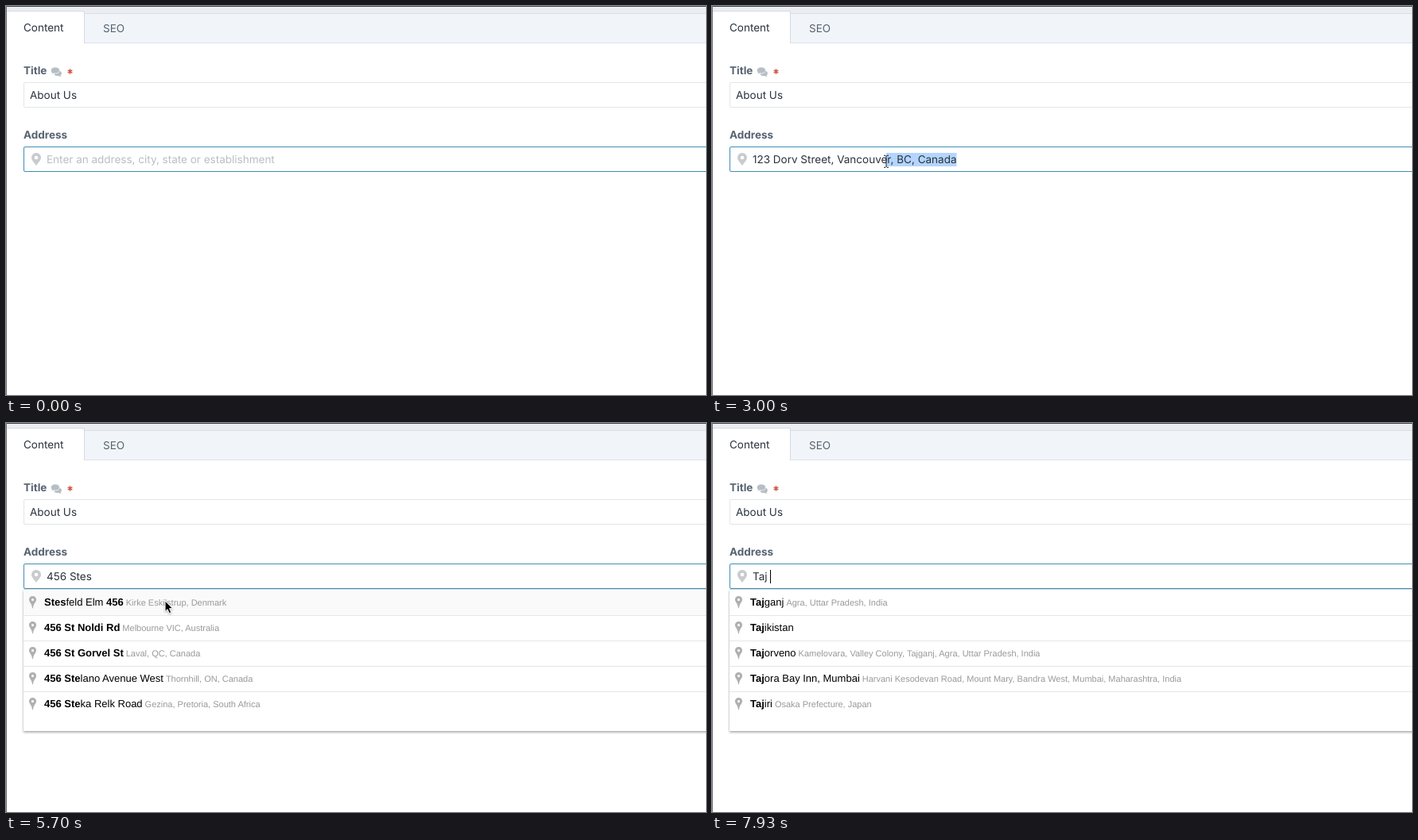
Recreate the animation shown at these times as an HTML page. Size 880 by 490 pixels, loop 8 s.

```html
<!DOCTYPE html>
<html lang="en">
<head>
<meta charset="utf-8">
<title>Address autocomplete</title>
<style>
  html, body { margin: 0; width: 100%; height: 100%; overflow: hidden; background: #fff; }
  svg { display: block; width: 880px; height: 490px; }
  text { white-space: pre; text-rendering: geometricPrecision; }
  .ui { font: 13.5px Inter, "Open Sans", sans-serif; fill: #29323d; }
  .label { font-weight: 700; fill: #576370; }
  .row { font: 13px "Liberation Sans", Arial, sans-serif; fill: #000; }
  .bold { font-weight: 700; }
  .place { font-size: 11px; fill: #999; }
</style>
</head>
<body>
<svg viewBox="0 0 880 490">
  <defs>
    <filter id="drop" x="-5%" y="-5%" width="110%" height="115%">
      <feDropShadow dx="0" dy="1.5" stdDeviation="1.4" flood-opacity=".38"/>
    </filter>
    <filter id="soft" x="-50%" y="-50%" width="200%" height="200%">
      <feDropShadow dx="0" dy="1" stdDeviation=".9" flood-opacity=".35"/>
    </filter>
    <path id="pin" fill="#b0b0b0" fill-rule="evenodd"
      d="M33.5 218a4.6 4.6 0 0 1 4.6 4.6c0 3-3.7 4.8-4.1 10.7h-1c-.4-5.900-4.100-7.700-4.100-10.700a4.600 4.600 0 0 1 4.600-4.600zm0 3a1.600 1.600 0 1 0 0 3.200a1.600 1.600 0 1 0 0-3.200z"/>
  </defs>

  <!-- page header -->
  <rect width="880" height="490" fill="#fff"/>
  <rect width="880" height="9" fill="#ebedf1"/>
  <rect y="9" width="880" height="38" fill="#f1f5f9"/>
  <rect y="9" width="880" height="1" fill="#d9dfe6"/>
  <rect y="46" width="880" height="1" fill="#dce2e8"/>
  <path d="M0 6H97a2 2 0 0 1 2 2V47H0z" fill="#d5dae1"/>
  <path d="M0 7H96.500a1.500 1.500 0 0 1 1.500 1.500V47H0z" fill="#fff"/>
  <rect width="880" height="1" fill="#3f444c"/>
  <rect width="1" height="490" fill="#6f7277"/>
  <text class="ui" x="22" y="32">Content</text>
  <text class="ui" x="122" y="33" style="fill:#576370">SEO</text>

  <!-- title field -->
  <text class="ui label" x="22" y="86">Title</text>
  <g fill="#b7bec8">
    <path d="M62 80.500c4 0 7.800 1.200 8 4.200c0 1.200-.7 2-1.500 2.600l1 1.500c-1.500 0-2.500-.4-3.300-.9c-2 .3-4.200-.1-5.400-1.200z"/>
    <path stroke="#fff" stroke-width=".7" d="M62 77c3.200 0 5.500 1.700 5.500 4s-2.300 4-5.500 4c-.6 0-1.200 0-1.800-.2c-.9.700-2 1.100-3.400 1.100c.6-.5 1-1.100 1.100-1.800c-.9-.8-1.500-1.800-1.500-3.100c0-2.300 2.400-4 5.600-4z"/>
  </g>
  <path d="M80.500 79.300v6.400M77.700 80.900l5.600 3.200M77.700 84.100l5.600-3.200" stroke="#cf5241" stroke-width="1.500"/>
  <rect x="22.500" y="96.500" width="870" height="31" rx="1.500" fill="#fff" stroke="#e3e5e8"/>
  <text class="ui" x="30" y="117">About Us</text>

  <!-- address field -->
  <text class="ui label" x="22" y="167">Address</text>
  <rect id="box" x="22.500" y="177.500" width="870" height="31" rx="1.500" fill="#fff"/>
  <path fill="#c8cbcf" fill-rule="evenodd" d="M38 185a6 6 0 0 1 6 6c0 3.500-3.800 6.500-6 10c-2.200-3.500-6-6.500-6-10a6 6 0 0 1 6-6zm0 3.700a2.300 2.300 0 1 0 0 4.600a2.300 2.300 0 1 0 0-4.600z"/>
  <rect id="mark" y="185" height="17" fill="#b4d5fe"/>
  <text id="value" class="ui" x="51" y="198"></text>
  <rect id="caret" y="185" width="1" height="17" fill="#000"/>

  <g id="menu">
    <rect x="22" y="210" width="880" height="178" fill="#fff" filter="url(#drop)"/>
    <rect x="22" y="209" width="858" height="1" fill="#d2d5d8"/>
    <rect id="hover" x="22" width="858" height="31" fill="#fafafa"/>
    <g id="rows"></g>
  </g>

  <path id="arrow" filter="url(#soft)" stroke="#fff" stroke-width="1" stroke-linejoin="round"
    d="M0 0V13.400L3 10.700L5.200 15.700L7.700 14.600L5.500 9.700H9.600Z"/>
  <path id="beam" fill="none" stroke="#222" d="M-3-7.500h2l1 1l1-1h2M0-6.500v13M-3 7.500h2l1-1l1 1h2"/>
</svg>

<script>
const LOOP = 8000;
const el = id => document.getElementById(id);
const [box, mark, value, caret, menu, hover, rows, arrow, beam] =
  ["box", "mark", "value", "caret", "menu", "hover", "rows", "arrow", "beam"].map(el);

// Rows: *matched* text | place
const num123 = [
  "*123* Velmo Street|Toronto, ON, Canada",
  "*123* Brendola Street|Philadelphia, PA, USA",
  "*123* Zel Avenue|New York, NY, USA",
  "*123* Vik Avenue|New York, NY, USA",
  "*123* Corvelise Street|New York, NY, USA"
];
const dorvSt = [
  "*123 Dorv St*reet|Vancouver, BC, Canada",
  "*123 Dorv St*reet|Buffalo, NY, USA",
  "*123 Dorv St*reet|Flushing, NY, USA",
  "*123 Dorv St*reet|Los Angeles, CA, USA",
  "*123* East *Dorv St*reet|Columbus, OH, USA"
];
const ste = [
  "*456 St Noldi Rd*|Melbourne VIC, Australia",
  "*456 St Gorvel St*|Laval, QC, Canada",
  "*456 Ste*lano Avenue West|Thornhill, ON, Canada",
  "*456 Ste*ka Relk Road|Gezina, Pretoria, South Africa",
  "*456 Ste*lano Avenue East|North York, ON, Canada"
];
const lists = {
  none: [],
  num123,
  dorv: dorvSt.map(r => r.replace("Dorv St*", "Dorv* St")),
  dorvSt,
  num456: num123.map(r => r.replace("123", "456")),
  st: ste.map(r => r.replace("456 Ste*", "456 St*e")),
  ste,
  stes: ["*Stes*feld Elm *456*|Kirke Eskilstrup, Denmark", ...ste.slice(0, 4)],
  taj: [
    "*Taj*ganj|Agra, Uttar Pradesh, India",
    "*Taj*ikistan",
    "*Taj*orveno|Kamelovara, Valley Colony, Tajganj, Agra, Uttar Pradesh, India",
    "*Taj*ora Bay Inn, Mumbai|Harvani Kesodevan Road, Mount Mary, Bandra West, Mumbai, Maharashtra, India",
    "*Taj*iri|Osaka Prefecture, Japan"
  ]
};

// [time, text]
const typed = [
  [-770, ""], [500, "1"], [600, "12"], [700, "123"], [830, "123 "],
  [1130, "123 D"], [1270, "123 Do"], [1330, "123 Dor"], [1430, "123 Dorv"],
  [1600, "123 Dorv "], [1770, "123 Dorv S"], [1830, "123 Dorv St"],
  [2230, "123 Dorv Street, Vancouver, BC, Canada"],
  [3900, "4"], [4000, "45"], [4100, "456"], [4370, "456 "], [4470, "456 S"],
  [4600, "456 St"], [4770, "456 Ste"], [4870, "456 Stes"],
  [5770, "Stesfeld Elm 456, Kirke Eskilstrup, Denmark"],
  [7630, "T"], [7700, "Ta"], [7800, "Taj"], [7900, "Taj "]
];
// [time, list]
const shown = [
  [0, "none"], [770, "num123"], [1500, "dorv"], [1900, "dorvSt"], [2230, "none"],
  [4200, "num456"], [4670, "st"], [4830, "ste"], [5070, "stes"], [5770, "none"],
  [7800, "taj"]
];
// [time, x, y] of the pointer
const path = [
  [1900, 190, 318], [2130, 183, 217], [2200, 182, 215], [2400, 226, 340],
  [2700, 226, 340], [2870, 312, 194], [3230, 3, 200], [3400, 3, 200], [3530, 226, 348],
  [5200, 226, 346], [5530, 200, 224], [5770, 200, 224], [6070, 282, 399],
  [6630, 282, 399], [6890, 338, 194], [7370, 3, 190]
];
const pointerOn = [[1900, 3900], [5200, 7630]];
const drags = [[2870, 3230, 3900], [6890, 7370, 7630]];
const blurred = [[2230, 2870], [5770, 6890]];

const within = (t, [from, to]) => t >= from && t < to;
const latest = (track, t) => track.findLast(k => k[0] <= t) || track[0];
const show = (node, on) => node.setAttribute("visibility", on ? "visible" : "hidden");

function pointerAt(t) {
  const i = path.findLastIndex(k => k[0] <= t);
  if (i < 0) return path[0].slice(1);
  const a = path[i], b = path[i + 1] || a;
  const p = b === a ? 0 : (t - a[0]) / (b[0] - a[0]);
  const s = p * p * (3 - 2 * p);
  return [a[1] + (b[1] - a[1]) * s, a[2] + (b[2] - a[2]) * s];
}

function rowMarkup(row, i) {
  const [name, place] = row.split("|");
  const parts = name.split("*").map((s, n) => s && `<tspan${n % 2 ? ' class="bold"' : ""}>${s}</tspan>`).join("");
  const tail = place ? `<tspan class="place" dx="3">${place}</tspan>` : "";
  const line = i ? '<rect x="22" y="210" width="858" height="1" fill="#e6e6e6"/>' : "";
  return `<g transform="translate(0 ${i * 32})">${line}<use href="#pin"/>` +
    `<text class="row" x="48" y="230">${parts}${tail}</text></g>`;
}

let lastText = null, lastList = null, textEnd = 51;

function setText(text) {
  if (text === lastText) return;
  lastText = text;
  value.textContent = text || "Enter an address, city, state or establishment";
  value.style.fill = text ? "" : "#b9bec5";
  textEnd = 51 + (text ? value.getComputedTextLength() : 0);
}

function setList(name) {
  if (name === lastList) return;
  lastList = name;
  rows.innerHTML = lists[name].map(rowMarkup).join("");
  menu.setAttribute("display", name === "none" ? "none" : "inline");
}

function draw(t) {
  const [since, text] = latest(typed, t);
  const focus = !blurred.some(b => within(t, b));
  const drag = drags.find(d => t >= d[0] && t < d[2]);
  const pointer = pointerOn.some(w => within(t, w));
  const [x, y] = pointerAt(t);

  setText(text);
  setList(latest(shown, t)[1]);
  box.setAttribute("stroke", focus ? "#3f8fb4" : "#e3e5e8");

  const from = Math.min(textEnd, Math.max(51, x));
  mark.setAttribute("x", from);
  mark.setAttribute("width", drag ? textEnd - from : 0);

  caret.setAttribute("x", Math.round(textEnd));
  show(caret, focus && !drag && (t - since) % 1000 < 500);

  const row = t < 1900 ? 3 : pointer ? Math.floor((y - 210) / 32) : -1;
  hover.setAttribute("y", 211 + 32 * row);
  hover.setAttribute("display", row >= 0 && row < 5 && lastList !== "none" ? "inline" : "none");

  const overText = x > 22 && y > 177 && y < 209;
  for (const node of [arrow, beam]) node.setAttribute("transform", `translate(${x} ${y})`);
  show(arrow, pointer && !overText);
  show(beam, pointer && overText);
}

const start = performance.now();
function tick() {
  draw((performance.now() - start) % LOOP);
  requestAnimationFrame(tick);
}
tick();
</script>
</body>
</html>
```
